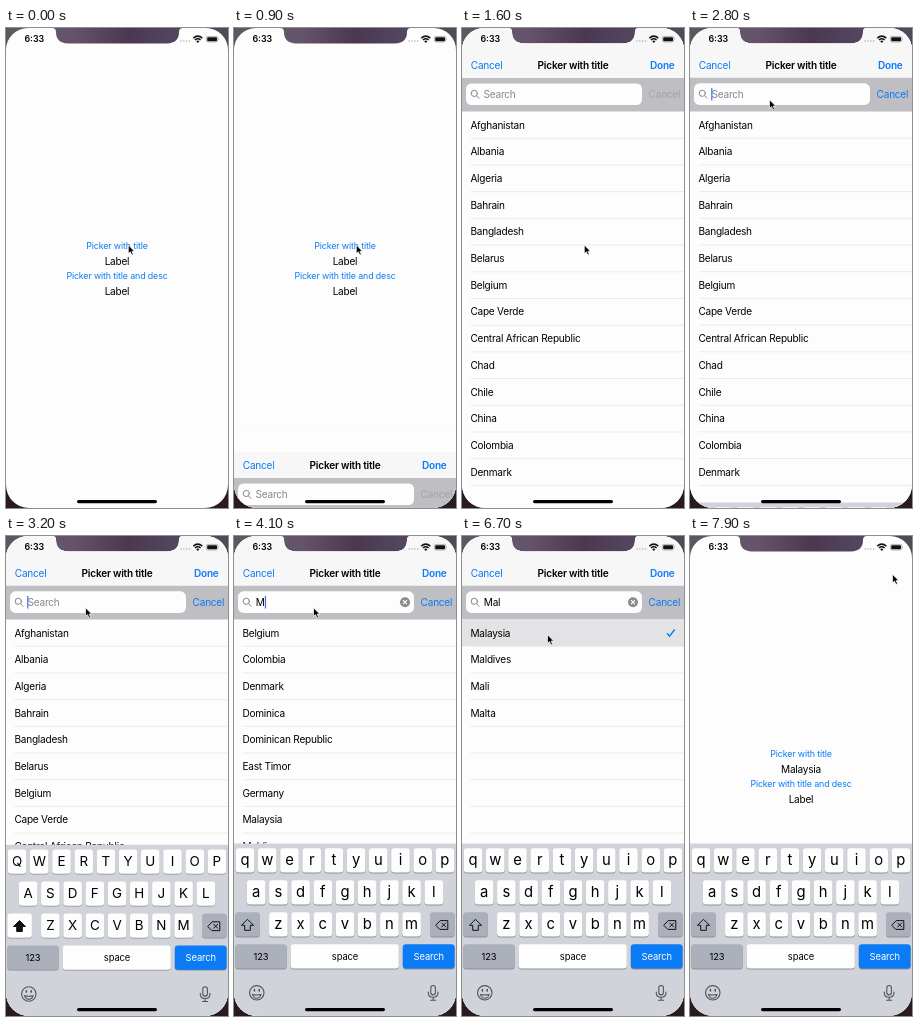
These frames come from a looping animation (222 px wide and 480 px high, 8000 ms). An HTML page:

```html
<!DOCTYPE html>
<html lang="en">
<head>
<meta charset="utf-8">
<title>Picker with search</title>
<style>
  html, body { margin: 0; width: 100%; height: 100%; overflow: hidden; background: #2a1b20; }
  svg { display: block; width: 100%; height: 100%; }
  text { font: 10.06px Inter, Roboto, sans-serif; letter-spacing: -.022em; white-space: pre; }
  .link { font-size: 8.88px; letter-spacing: -.016em; }
  .blue { fill: #0b7bf6; }
  .bold { font-weight: 600; }
  .mid { text-anchor: middle; }
  .clock { font-size: 8.88px; font-weight: 600; letter-spacing: 0; }
  .lower { font-size: 14.8px; letter-spacing: 0; }
  .upper { font-size: 13.4px; letter-spacing: 0; }
  .small { font-size: 9.4px; letter-spacing: -.01em; }
</style>
</head>
<body>
<svg viewBox="0 0 222 480" preserveAspectRatio="none">
  <defs>
    <linearGradient id="wall">
      <stop offset="0" stop-color="#5b5862"/>
      <stop offset=".3" stop-color="#65546c"/>
      <stop offset=".55" stop-color="#4a3850"/>
      <stop offset=".75" stop-color="#54455f"/>
      <stop offset="1" stop-color="#504a58"/>
    </linearGradient>
    <clipPath id="screen">
      <path d="M22 0H46q4 0 4 4q0 11 12 11.5H161q12-.5 12-11.5q0-4 4-4H200a22 22 0 0 1 22 22V457a23 23 0 0 1-23 23H23a23 23 0 0 1-23-23V22a22 22 0 0 1 22-22z"/>
    </clipPath>
    <clipPath id="table"><path d="M0 83.5H222V460H0z"/></clipPath>
  </defs>
  <path fill="url(#wall)" d="M0 0H222V60H0z"/>
  <g clip-path="url(#screen)">
    <path fill="#fdfdfd" d="M0 0H222V480H0z"/>
    <g class="mid">
      <text id="open" class="link blue" x="111" y="221.2">Picker with title</text>
      <text id="label" x="111" y="236.6">Label</text>
      <text class="link blue" x="111" y="250.9">Picker with title and desc</text>
      <text x="111" y="266.6">Label</text>
    </g>

    <g id="sheet">
      <path fill="#fdfdfd" d="M0 0H222V480H0z"/>
      <path id="top" fill="#f7f7f8" d="M0 0H222V24H0z"/>
      <path fill="#f7f7f8" d="M0 23.5H222V50H0z"/>
      <text class="blue" x="8.8" y="40.6">Cancel</text>
      <text class="bold mid" x="111" y="40.6">Picker with title</text>
      <text class="blue bold" x="188" y="40.6">Done</text>
      <path fill="#bfbec3" d="M0 49.8H222V83.5H0z"/>
      <rect x="4" y="55.3" width="176" height="21.6" rx="5.5" fill="#fdfdfd"/>
      <g fill="none" stroke="#85858a" stroke-linecap="round">
        <circle cx="12.3" cy="65.3" r="3.1"/><path d="M14.6 67.7L17 70.2"/>
      </g>
      <text id="hint" x="21.5" y="69.8" fill="#88888d">Search</text>
      <text id="query" x="21.8" y="69.8"></text>
      <path id="caret" fill="#3f6ee8" d="M0 60H1.2V72.5H0z"/>
      <g id="clear">
        <circle cx="171" cy="66.2" r="5" fill="#8a8a8f"/>
        <path stroke="#fff" stroke-width="1.1" d="M169 64.2l4 4m0-4l-4 4"/>
      </g>
      <text id="quit" x="186.6" y="69.8">Cancel</text>
      <g id="rows" clip-path="url(#table)"></g>
    </g>

    <g id="keys">
      <path fill="#d0d3d9" d="M0 307.5H222V482H0z"/>
      <g id="plates"></g>
      <g id="letters"></g>
      <path id="shift" stroke="#111" stroke-width="1" stroke-linejoin="round" d="M13.5 383.3l6 6h-3.2v5h-5.6v-5h-3.2z"/>
      <g fill="none" stroke="#111" stroke-width="1" stroke-linejoin="round" stroke-linecap="round">
        <path d="M202 389l4.2-4.4h7.6v8.8h-7.6z"/><path d="M207.7 387l4 4m0-4l-4 4"/>
      </g>
      <g class="mid">
        <text class="small" x="27" y="424">123</text>
        <text class="small" x="111" y="423.8">space</text>
        <text class="small" x="194.8" y="423.8" fill="#fff">Search</text>
      </g>
      <g fill="none" stroke="#50545b" stroke-width="1.1" stroke-linecap="round">
        <circle cx="22.8" cy="456.8" r="7.2"/>
        <path d="M18.6 458.5q4.2 1 8.4 0q-.8 3.7-4.2 3.7t-4.2-3.7z"/>
        <path stroke-width="1.6" d="M20.4 453.5v1.4m4.8-1.4v1.4"/>
        <rect x="196.8" y="449.5" width="4.6" height="9.4" rx="2.3"/>
        <path d="M194.3 456v1q0 4.3 4.8 4.3t4.8-4.3v-1M199.1 461.4v2.9m-2.6 0h5.2"/>
      </g>
    </g>

    <text class="clock" x="18.4" y="14.3">6:33</text>
    <path stroke="#aaa" stroke-width="1.5" stroke-linecap="round" stroke-dasharray="0 2.9" d="M175 13H184.5"/>
    <g fill="none" stroke="#111" stroke-width="1.5">
      <path d="M187.3 10.1q4.5-4 9 0M189 12q2.8-2.5 5.6 0"/>
      <path fill="#111" stroke="none" d="M190.2 13.2q1.6-1.3 3.2 0l-1.6 1.7z"/>
    </g>
    <rect x="200.3" y="8.4" width="11.6" height="5.6" rx="1.6" fill="none" stroke="#888" stroke-width=".6"/>
    <rect x="201.2" y="9.2" width="9.8" height="4" rx=".9" fill="#111"/>
    <path fill="#888" d="M212.5 10.2q1 1 0 2z"/>
    <rect x="71" y="472" width="80" height="3.2" rx="1.6"/>
  </g>
  <path id="mouse" stroke="#fff" stroke-width=".7" stroke-linejoin="round"
    d="M0 0V8.6L2 6.8L3.5 10.1L5 9.4L3.6 6.3H6.2z"/>
</svg>
<script>
const LOOP = 8000, STEP = 100, ROW = 26.7, TOP = 83.5;
const $ = id => document.getElementById(id);
const show = (id, on) => $(id).style.display = on ? '' : 'none';
const shift = (id, x, y) => $(id).setAttribute('transform', `translate(${x} ${y})`);

const countries = ['Afghanistan', 'Albania', 'Algeria', 'Bahrain', 'Bangladesh',
  'Belarus', 'Belgium', 'Cape Verde', 'Central African Republic', 'Chad', 'Chile',
  'China', 'Colombia', 'Denmark', 'Dominica', 'Dominican Republic', 'East Timor',
  'Germany', 'Malaysia', 'Maldives', 'Mali', 'Malta'];

// time, typed text
const typing = [[0, ''], [3700, 'M'], [4400, 'Ma'], [4900, 'Mal']];
// spans with the caret hidden
const blinks = [[0, 2800], [3400, 3700], [5400, 5900], [6400, LOOP]];
// start, end, x, y
const moves = [[0, 0, 122.3, 217], [1700, 2200, 79.5, 71.8], [5300, 6100, 85.5, 98.8], [6700, 7200, 202.5, 38.3]];

// Critically damped: 1 at the start, settling to 0
function settle(t, start, speed) {
  const a = Math.max(0, t - start) / 1000 * speed;
  return (1 + a) * Math.exp(-a);
}

function mouseAt(t) {
  let [, , x, y] = moves[0];
  for (const [a, b, tx, ty] of moves.slice(1)) {
    const p = Math.min(1, Math.max(0, (t - a) / (b - a)));
    const e = p * p * (3 - 2 * p);
    x += (tx - x) * e;
    y += (ty - y) * e;
  }
  return [x, y];
}

function plate(x, y, w, fill) {
  const box = (dy, c) => `<rect x="${x}" y="${y + dy}" width="${w}" height="24.4" rx="3" fill="${c}"/>`;
  return box(.8, '#8d9096') + box(0, fill);
}

const lines = ['qwertyuiop', 'asdfghjkl', 'zxcvbnm'];
const keyX = (r, i) => [11.1, 22.2, 44.4][r] + i * 22.2;
const keyY = r => 312.2 + r * 32;

function drawPlates(caps) {
  const grey = '#abb0ba';
  let out = '';
  lines.forEach((s, r) => [...s].forEach((c, i) => out += plate(keyX(r, i) - 9.3, keyY(r), 18.6, '#fdfdfd')));
  out += plate(1.3, keyY(2), 24.6, caps ? '#fdfdfd' : grey) + plate(196, keyY(2), 24.6, grey);
  out += plate(1.3, keyY(3), 51.4, grey) + plate(56.6, keyY(3), 108.2, '#fdfdfd') + plate(168.8, keyY(3), 51.8, '#0b7bf6');
  $('plates').innerHTML = out;
}

function drawLetters(caps) {
  let out = '';
  lines.forEach((s, r) => [...s].forEach((c, i) => {
    const y = keyY(r) + (caps ? 17 : 16.3);
    out += `<text class="mid ${caps ? 'upper' : 'lower'}" x="${keyX(r, i)}" y="${y}">${caps ? c.toUpperCase() : c}</text>`;
  }));
  $('letters').innerHTML = out;
  $('shift').setAttribute('fill', caps ? '#111' : 'none');
}

function drawRows(text, picked) {
  const hits = countries.filter(c => c.toLowerCase().includes(text.toLowerCase()));
  let out = picked ? `<path fill="#e3e3e5" d="M0 ${TOP}h222v${ROW}H0z"/>` : '';
  for (let i = 0; i < 15; i++) {
    const y = TOP + i * ROW;
    out += `<path stroke="#dededf" stroke-width=".6" d="M8.5 ${y + ROW}H222"/>`;
    out += `<text x="8.4" y="${y + 17}">${hits[i] || ''}</text>`;
  }
  if (picked) out += '<path fill="none" stroke="#0b7bf6" stroke-width="1.4" d="M205 97.3l2.5 2.9l5.2-6.7"/>';
  $('rows').innerHTML = out;
}

let last = '';
function draw(t) {
  const text = typing.filter(s => s[0] <= t).pop()[1];
  const caps = t < 3700, picked = t >= 6400;

  const state = [text, caps, picked].join();
  if (state !== last) {
    last = state;
    drawPlates(caps);
    drawLetters(caps);
    drawRows(text, picked);
    $('query').textContent = text;
    show('hint', !text);
    show('clear', text);
  }

  const leaving = t >= 7280;
  const low = leaving ? 1 - settle(t, 7280, 14.6) : settle(t, 850, 14.6);
  shift('sheet', 0, 480 * low);
  show('sheet', low < .998);
  $('top').style.opacity = leaving ? 0 : Math.min(1, Math.max(0, (t - 1300) / 200));

  shift('keys', 0, 173 * settle(t, 2783, 16.9));
  show('keys', t > 2783);

  $('quit').setAttribute('fill', t < 2800 ? '#a3a3a9' : '#0b7bf6');
  $('open').style.opacity = t === 600 ? .3 : t === 700 ? .7 : 1;
  $('label').textContent = leaving ? 'Malaysia' : 'Label';

  show('caret', !blinks.some(([a, b]) => t >= a && t < b));
  shift('caret', text ? 21.8 + $('query').getComputedTextLength() + .2 : 21.2, 0);
  shift('mouse', ...mouseAt(t));
}

const began = performance.now();
function tick() {
  const t = (performance.now() - began) % LOOP;
  draw(Math.floor(t / STEP) * STEP);
  requestAnimationFrame(tick);
}
tick();
</script>
</body>
</html>
```
